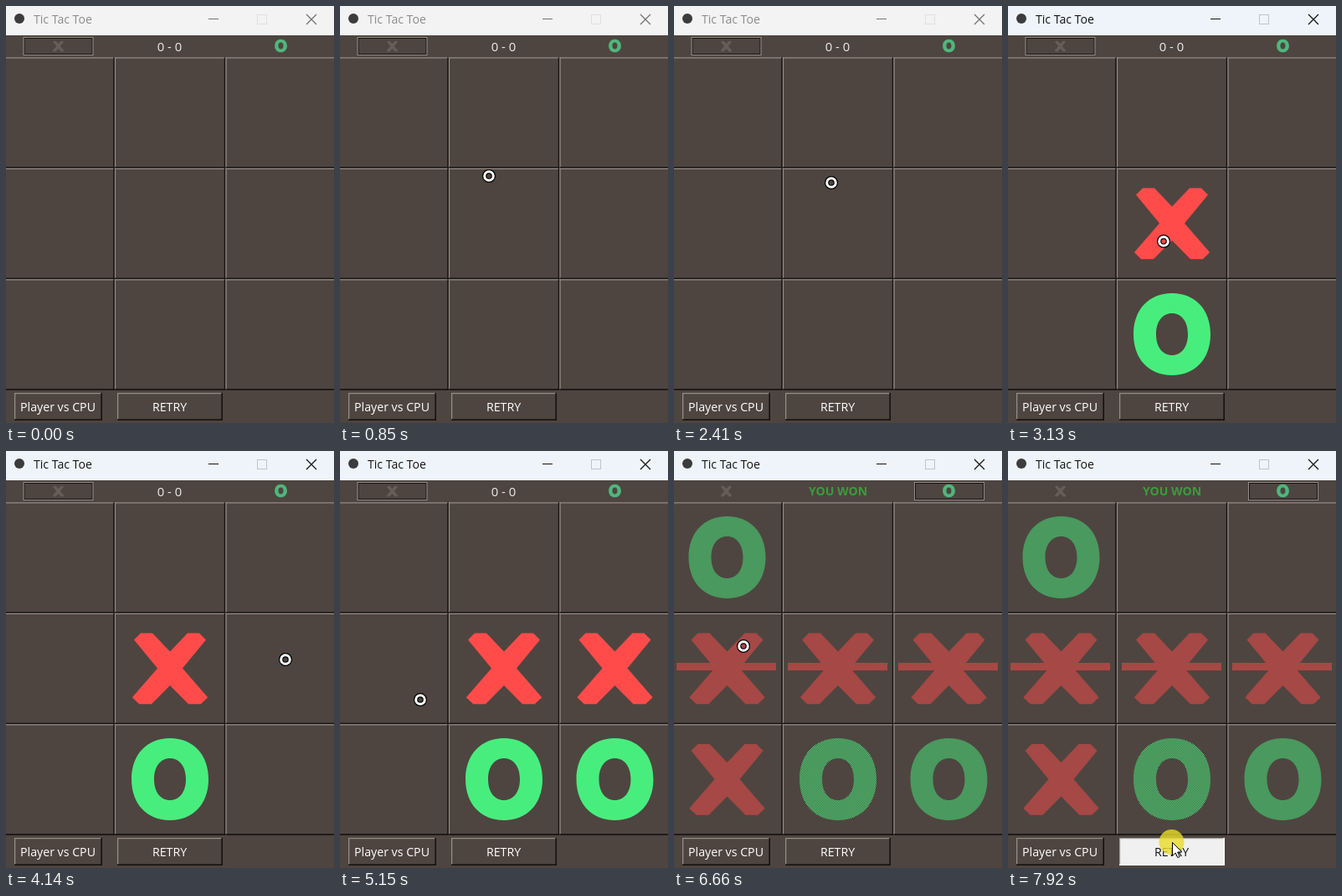
Recreate the animation shown at these times as an HTML page with a canvas. Size 392x498 px, loop 8000 ms.

```html
<!DOCTYPE html>
<html lang="en">
<head>
<meta charset="utf-8">
<title>Tic Tac Toe</title>
<style>
  html, body { margin: 0; width: 100%; height: 100%; overflow: hidden; background: #4e4540; }
  canvas { display: block; }
</style>
</head>
<body>
<canvas id="stage" width="392" height="498"></canvas>
<script>
const LOOP = 8000, PITCH = 132.5;
const BG = '#4e4540', RED = '#ff4c4a', GREEN = '#47ee7d', LIGHT = '#978f89', DARK = '#15110f';
const ctx = document.getElementById('stage').getContext('2d');

// Each move eases from the previous place along a bowed line
const entry = { start: 320, x: 308, y: 462 };
const moves = [
  { start: 320, end: 1030, x: 189, y: 166, bow: -80 },
  { start: 1450, end: 1650, x: 268, y: 57, bow: 0 },
  { start: 1650, end: 2050, x: 110, y: 290, bow: 0 },
  { start: 2050, end: 2410, x: 188, y: 211, bow: 0 },
  { start: 2410, end: 2900, x: 186, y: 281, bow: 0 },
  { start: 3610, end: 4220, x: 338, y: 246, bow: 25 },
  { start: 4750, end: 5330, x: 57, y: 300, bow: -10 },
  { start: 5490, end: 5640, x: 64, y: 369, bow: 0 },
  { start: 5940, end: 6240, x: 83, y: 233, bow: 0 },
  { start: 6850, end: 7700, x: 196, y: 467, bow: -10 }
];

// The player presses a cell; the reply lands on release
const turns = [
  { press: 2480, release: 2580, cell: [1, 1], reply: [1, 2] },
  { press: 4410, release: 4510, cell: [2, 1], reply: [2, 2] },
  { press: 5660, release: 5760, cell: [0, 2], reply: [0, 0] },
  { press: 6420, release: 6540, cell: [0, 1] }
];
const WIN = turns[3].release, RETRY = 7820;

const clamp01 = v => Math.min(1, Math.max(0, v));

function pointerAt(t) {
  let { x, y } = entry;
  for (const m of moves) {
    if (t < m.start) break;
    const s = 1 - (1 - clamp01((t - m.start) / (m.end - m.start))) ** 1.7;
    const dx = m.x - x, dy = m.y - y;
    const side = m.bow * Math.sin(Math.PI * s) / Math.hypot(dx, dy);
    x += dx * s - dy * side;
    y += dy * s + dx * side;
  }
  return [x, y];
}

function stipple(color) {
  const tile = document.createElement('canvas');
  tile.width = tile.height = 2;
  const c = tile.getContext('2d');
  c.fillStyle = color;
  c.fillRect(0, 0, 2, 2);
  c.fillStyle = BG;
  c.fillRect(0, 0, 1, 1);
  c.fillRect(1, 1, 1, 1);
  return ctx.createPattern(tile, 'repeat');
}
const dimRed = stipple(RED), dimGreen = stipple(GREEN);

function rect(x, y, w, h, color) {
  ctx.fillStyle = color;
  ctx.fillRect(x, y, w, h);
}

function disc(x, y, r, color) {
  ctx.fillStyle = color;
  ctx.beginPath();
  ctx.arc(x, y, r, 0, 7);
  ctx.fill();
}

function text(str, x, y, size, color, align = 'center', weight = 400) {
  ctx.font = `${weight} ${size}px "Open Sans", "Noto Sans", sans-serif`;
  ctx.textAlign = align;
  ctx.fillStyle = color;
  ctx.fillText(str, x, y);
}

function bevel(x, y, w, h, pressed) {
  const near = pressed ? '#a0a0a0' : LIGHT, far = pressed ? '#ffffff' : DARK;
  rect(x, y, w, h, pressed ? '#f0f0f0' : BG);
  rect(x, y, w, 1.2, near);
  rect(x, y, 1.2, h, near);
  rect(x, y + h - 1.6, w, 1.6, far);
  rect(x + w - 1.6, y, 1.6, h, far);
}

// The cross is one corner mirrored both ways, a little wider at the foot
function makeCross() {
  const corner = [[0, 20], [21, 42], [35, 42], [43, 34], [15, 0]];
  const right = [
    ...corner.map(([x, y]) => [x, -y]),
    ...corner.slice(0, -1).reverse().map(([x, y]) => [x * 1.05, y * 1.02])
  ];
  const left = right.slice(1, -1).reverse().map(([x, y]) => [-x, y]);
  return new Path2D('M' + [...right, ...left].join('L') + 'Z');
}

function makeOval() {
  const shape = new Path2D(), k = 0.6;
  for (const [rx, ry] of [[46, 49], [19, 25]]) {
    shape.moveTo(0, -ry);
    shape.bezierCurveTo(rx * k, -ry, rx, -ry * k, rx, 0);
    shape.bezierCurveTo(rx, ry * k, rx * k, ry, 0, ry);
    shape.bezierCurveTo(-rx * k, ry, -rx, ry * k, -rx, 0);
    shape.bezierCurveTo(-rx, -ry * k, -rx * k, -ry, 0, -ry);
  }
  return shape;
}
const cross = makeCross(), oval = makeOval();

function mark(shape, x, y, color, scale = 1) {
  ctx.save();
  ctx.translate(x, y);
  ctx.scale(scale, scale);
  ctx.fillStyle = color;
  ctx.fill(shape, 'evenodd');
  ctx.restore();
}

const cellMark = (shape, [col, row], color) =>
  mark(shape, 63.5 + PITCH * col, 127 + PITCH * row, color);

function titleBar(t) {
  const active = clamp01((t - 2500) / 400);
  const mix = (a, b) => 'rgb(' + a.map((v, i) => Math.round(v + (b[i] - v) * active)) + ')';
  rect(0, 0, 392, 35, mix([243, 243, 243], [239, 244, 250]));
  disc(16, 15, 6, '#3c3c3c');
  text('Tic Tac Toe', 33, 21, 14.1, mix([140, 140, 140], [20, 20, 20]), 'left');
  const ink = mix([115, 115, 115], [20, 20, 20]);
  rect(242, 15, 12, 1, ink);
  ctx.lineWidth = 1;
  ctx.strokeStyle = mix([224, 224, 224], [190, 196, 206]);
  ctx.strokeRect(300.5, 10.5, 11, 11);
  ctx.strokeStyle = ink;
  ctx.lineWidth = 1.3;
  ctx.stroke(new Path2D('M359 10L371 22M371 10L359 22'));
}

function statusBar(won) {
  const x = won ? 287 : 20.5;
  ctx.lineWidth = 1;
  ctx.strokeStyle = DARK;
  ctx.strokeRect(x + 1.5, 38.5, 81, 19);
  ctx.strokeStyle = LIGHT;
  ctx.strokeRect(x + 0.5, 37.5, 83, 21);
  mark(cross, 62.5, 48, '#665d58', 0.15);
  mark(oval, 328.5, 47.5, '#50b67c', 0.16);
  if (won) text('YOU WON', 196, 53, 14.1, '#3c9c3c', 'center', 700);
  else text('0 - 0', 195.5, 53.5, 14.8, '#eeeeee');
}

function board(t, won) {
  const pressed = turns.find(turn => t >= turn.press && t < turn.release);
  for (let row = 0; row < 3; row++)
    for (let col = 0; col < 3; col++) {
      const down = pressed && pressed.cell.join() === [col, row].join();
      bevel(PITCH * col - 2.6, 61.3 + PITCH * row, PITCH, PITCH, down);
    }
  for (const { release, cell, reply } of turns) {
    if (t < release) continue;
    cellMark(cross, cell, won ? dimRed : RED);
    if (reply) cellMark(oval, reply, won ? dimGreen : GREEN);
  }
  if (won) for (let col = 0; col < 3; col++) rect(Math.round(3 + PITCH * col), 253, 119, 9, dimRed);
}

function footer(retry) {
  bevel(10, 462, 105, 33, false);
  text('Player vs CPU', 62, 484, 14.2, '#ffffff');
  bevel(133, 462, 126, 33, retry);
  text('RETRY', 195.5, 484, 14.2, retry ? '#111111' : '#ffffff');
}

const arrow = new Path2D('M.5 .5V16.5L4.2 13L6.8 18.6L9.2 17.5L6.7 12H11.8Z');

function pointer(t) {
  if (t < entry.start) return;
  const [x, y] = pointerAt(t);
  const clicking = t >= RETRY || turns.some(turn => t >= turn.press && t < turn.release);
  ctx.save();
  ctx.translate(Math.round(x), Math.round(y));
  if (clicking) disc(-0.5, 0, 15, 'rgba(232, 220, 40, .8)');
  if (y > 61 && y < 459) {
    ctx.beginPath();
    ctx.arc(0, 0, 5.3, 0, 7);
    ctx.strokeStyle = '#000';
    ctx.lineWidth = 5.4;
    ctx.stroke();
    ctx.strokeStyle = '#fff';
    ctx.lineWidth = 3;
    ctx.stroke();
  } else {
    ctx.fillStyle = '#fff';
    ctx.strokeStyle = '#000';
    ctx.lineWidth = 1;
    ctx.fill(arrow);
    ctx.stroke(arrow);
  }
  ctx.restore();
}

function draw(now) {
  const t = now % LOOP, won = t >= WIN;
  rect(0, 0, 392, 498, BG);
  titleBar(t);
  statusBar(won);
  board(t, won);
  footer(t >= RETRY);
  pointer(t);
  requestAnimationFrame(draw);
}
requestAnimationFrame(draw);
</script>
</body>
</html>
```
